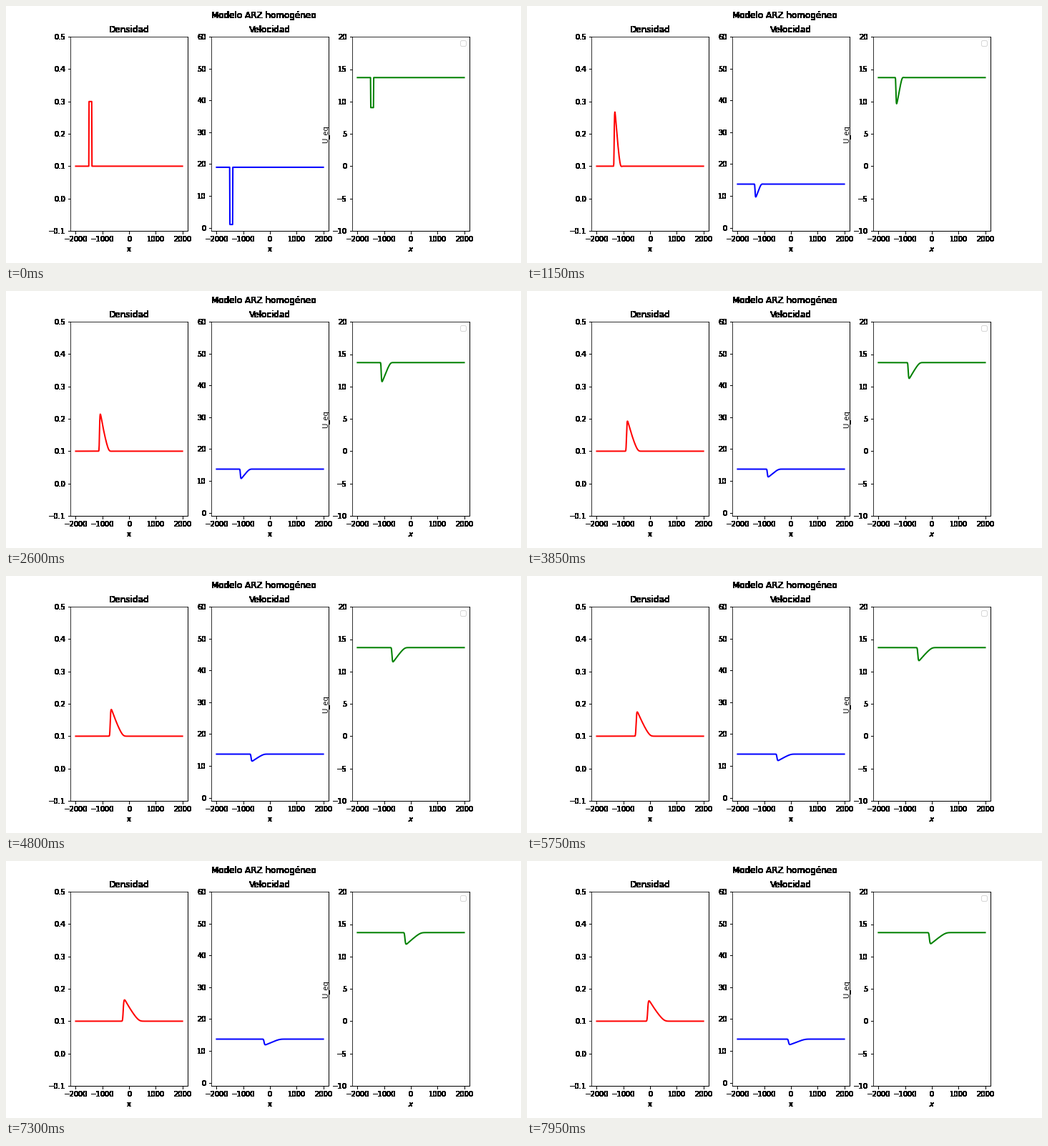
A matplotlib script for the animation above (8 s loop, 720 by 360 pixels).

```python
import numpy as np
import matplotlib.pyplot as plt
from matplotlib.animation import FuncAnimation

FRAMES, INTERVAL = 160, 50
DT_FRAME, SUBSTEPS = 1.1, 24      # model time per frame, solver steps per frame
DX, NU, TAU = 5.0, 22.0, 0.8      # cell size, viscosity, relaxation time

plt.rcParams.update({
    "font.family": "DejaVu Sans", "font.size": 10,
    "figure.subplot.left": 0.125, "figure.subplot.right": 0.9,
    "figure.subplot.bottom": 0.125, "figure.subplot.top": 0.88,
})

PANELS = [
    ("Densidad", "x", (-0.1, 0.5), "red"),
    ("Velocidad", "x", (-1, 60), "blue"),
    ("", "$x$", (-10, 20), "green"),
]


def u_eq(rho):
    """Equilibrium speed for a given density."""
    e = rho - 0.1
    return 13.7 - 29 * e + 29 * e**2


def solve():
    """Traffic waves: density plus a speed excess carried by the cars."""
    x = np.arange(-2000, 2000 + DX, DX)
    jam = (x >= -1500) & (x <= -1400)
    rho = np.where(jam, 0.3, 0.1)
    excess = np.where(jam, 1.0, 19.0) - u_eq(rho)
    dt = DT_FRAME / SUBSTEPS
    states = []
    for _ in range(FRAMES):
        u = u_eq(rho)
        states.append((rho[::2].copy(), (u + excess)[::2], u[::2]))
        for _ in range(SUBSTEPS):
            v = u_eq(rho) + excess
            q = rho * v
            flux = (q[1:] + q[:-1]) / 2 - NU * np.diff(rho) / DX
            slope = np.diff(excess, prepend=excess[0]) / DX
            rho[1:-1] -= dt / DX * np.diff(flux)
            excess = (excess - dt * np.maximum(v, 0) * slope) * np.exp(-dt / TAU)
    return x[::2], states


def add_axes():
    axes = fig.subplots(1, 3)
    for ax, (_, _, ylim, _) in zip(axes, PANELS):
        ax.set_xlim(-2200, 2200)
        ax.set_ylim(*ylim)
    return axes


def render_backdrop():
    """Draw the static parts on a clear page and drop the alpha channel,
    which gives the labels outside the axes their hard, heavy edges."""
    fig.set_facecolor("none")
    fig.suptitle("Modelo ARZ homogéneo")
    axes = add_axes()
    for ax, (title, xlabel, _, _) in zip(axes, PANELS):
        ax.set_title(title)
        ax.set_xlabel(xlabel)
        ax.set_xticks(range(-2000, 2001, 1000))
    axes[2].set_ylabel("U_eq")
    axes[2].legend(handles=[], loc="upper right")
    fig.canvas.draw()
    rgb = np.array(fig.canvas.buffer_rgba())[..., :3]
    fig.clear()
    fig.set_facecolor("white")
    return rgb


fig = plt.figure(figsize=(10, 5), dpi=72)
fig.figimage(render_backdrop(), origin="upper", zorder=-1)

xs, states = solve()
lines = []
for ax, (_, _, _, color) in zip(add_axes(), PANELS):
    ax.axis("off")
    lines += ax.plot(xs, states[0][0], color=color, lw=2)


def update(i):
    for line, ys in zip(lines, states[i]):
        line.set_data(xs, ys)
    return lines


anim = FuncAnimation(fig, update, frames=FRAMES, interval=INTERVAL,
                     init_func=lambda: update(0), repeat=True, repeat_delay=0)
plt.show()
```
